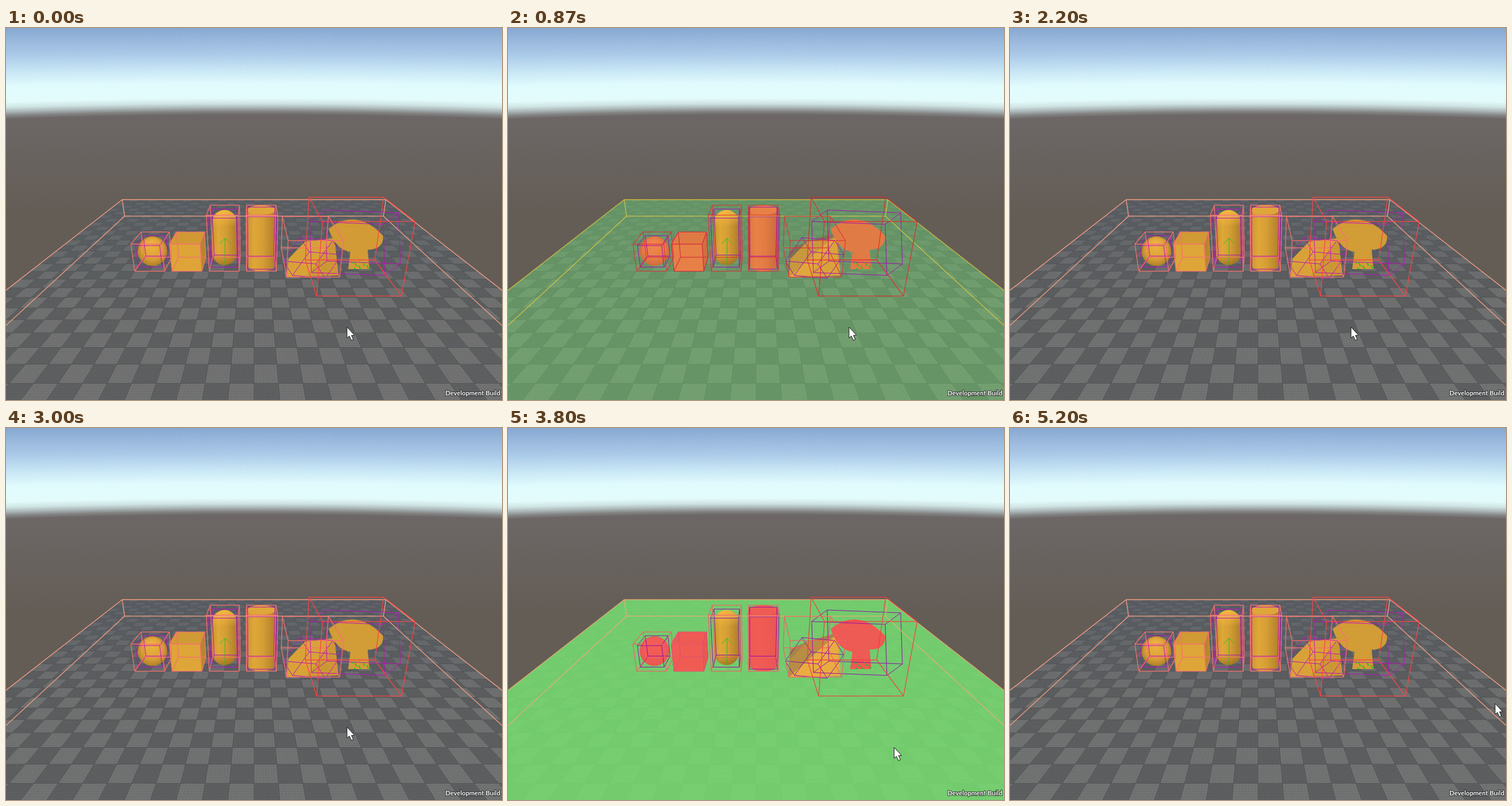
Animation, 864 px wide and 648 px high, one loop 5270 ms. Source, as an HTML page with a canvas:

```html
<!DOCTYPE html>
<html lang="en">
<head>
<meta charset="utf-8">
<title>Bounds view</title>
<style>
html, body { margin: 0; width: 100%; height: 100%; overflow: hidden; background: #655e57; }
canvas { display: block; }
</style>
</head>
<body>
<canvas id="stage" width="864" height="648"></canvas>
<script>
const W = 864, H = 648, LOOP = 5270, CYCLE = 3130;
const stage = document.getElementById('stage').getContext('2d');

// Camera: 60 degree view, pitched 20 degrees down, 5.5 above and 10 before the floor's centre.
const FOCAL = H / 2 / Math.tan(Math.PI / 6), PITCH = Math.PI / 9;
const SIN = Math.sin(PITCH), COS = Math.cos(PITCH);
const HALF = 7.5, TILE = .5;

function project(x, y, z) {
  const drop = 5.5 - y, far = 10 + z;
  const scale = FOCAL / (far * COS + drop * SIN);
  return [W / 2 + x * scale, H / 2 + (drop * COS - far * SIN) * scale, scale];
}

// Corner i of a box: bit 1 is right, bit 2 is top, bit 4 is back.
const side = (i, bit) => i & bit ? .5 : -.5;
const corner = (b, i, grow = 1) => project(
  b.x + b.w * grow * side(i, 1),
  b.y + b.h * (.5 + grow * side(i, 2)),
  b.z + b.d * grow * side(i, 4));

const bodies = [
  ...[1, 1, 2, 2].map((h, i) => ({ x: -3.5 + 1.25 * i, y: 0, z: 0, w: 1, h, d: 1 })),
  { x: 1.92, y: 0, z: .2, w: 1.72, h: 1.3, d: 2.15 },
  { x: 3.085, y: 0, z: -.82, w: 2.49, h: 2.35, d: 2.23 }
];
const [ball, cube, pill, drum] = bodies;
const slab = { x: 0, y: -1, z: 0, w: 2 * HALF, h: 1, d: 2 * HALF };

function layer(draw) {
  const c = document.createElement('canvas');
  c.width = W; c.height = H;
  draw(c.getContext('2d'));
  return c;
}

function trace(g, pts) {
  g.beginPath();
  pts.forEach(([x, y]) => g.lineTo(x, y));
}

function poly(g, color, ...pts) {
  trace(g, pts);
  g.closePath();
  g.fillStyle = color;
  g.fill();
}

function line(g, color, ...pts) {
  trace(g, pts);
  g.strokeStyle = color;
  g.stroke();
}

function wire(g, color, at) {
  for (let i = 0; i < 8; i++) {
    for (const bit of [1, 2, 4]) if (!(i & bit)) line(g, color, at(i), at(i | bit));
  }
}

// Skewed box on screen, spanned by three edges from one corner
const skewBox = (origin, ...edges) => i =>
  [0, 1].map(k => edges.reduce((sum, e, n) => sum + (i >> n & 1) * e[k], origin[k]));

function gradient(g, x0, y0, x1, y1, stops) {
  const gr = g.createLinearGradient(x0, y0, x1, y1);
  stops.forEach(([at, color]) => gr.addColorStop(at, color));
  return gr;
}

function sky(g) {
  const stops = [[0, '#89a8d2'], [.3, '#abcae8'], [.5, '#cbe9f6'], [.64, '#e1fbfd'],
    [.81, '#e3fbfb'], [.87, '#cfe3e3'], [.92, '#a8b4b5'], [.96, '#858585'], [1, '#6c6766']];
  for (let x = 0; x < W; x += 2) {
    const dip = 8 * (x / W * 2 - 1) ** 2;
    g.fillStyle = gradient(g, 0, 0, 0, 151 + dip, stops);
    g.fillRect(x, 0, 2, 170);
  }
  g.fillStyle = gradient(g, 0, 161, 0, 320, [[0, '#6c6766'], [1, '#645d56']]);
  g.fillRect(0, 161, W, H);
}

const ground = (x, z) => project(x, 0, z);
const floor = (g, color) => poly(g, color, ...[6, 7, 3, 2].map(i => corner(slab, i)));

function checker(g) {
  floor(g, '#727373');
  for (let x = -HALF; x < HALF; x += TILE) {
    for (let z = -HALF; z < HALF; z += TILE) {
      if ((x + z) / TILE & 1) {
        poly(g, '#5e5f61', ground(x, z), ground(x + TILE, z), ground(x + TILE, z + TILE), ground(x, z + TILE));
      }
    }
  }
  for (let s = -HALF; s <= HALF; s += TILE / 8) {
    const color = s % TILE ? 'rgba(50,52,56,.08)' : 'rgba(45,47,50,.35)';
    line(g, color, ground(s, -HALF), ground(s, HALF));
    line(g, color, ground(-HALF, s), ground(HALF, s));
  }
  const haze = gradient(g, 0, 299, 0, 470, [[0, 'rgba(90,96,104,.6)'], [1, 'rgba(90,96,104,0)']]);
  floor(g, haze);
}

function objects(g, flat) {
  const shape = (color, draw) => {
    g.fillStyle = color;
    g.beginPath();
    draw();
    g.fill();
  };
  const round = (x, r) => gradient(g, x - r, 0, x + r, 0,
    [[0, '#cb9632'], [.25, '#dfa738'], [.55, '#d59e35'], [1, '#ad7e29']]);

  const [bx, by, bs] = project(ball.x, .5, 0);
  const glow = g.createRadialGradient(bx - 2, by - 13, 3, bx, by, bs / 2 + 2);
  glow.addColorStop(0, '#eeb142');
  glow.addColorStop(.6, '#dda437');
  glow.addColorStop(1, '#ad7d29');
  shape(flat || glow, () => g.arc(bx, by, bs / 2 + .5, 0, 7));

  const cubeFace = (color, ...ids) => poly(g, flat || color, ...ids.map(i => corner(cube, i)));
  cubeFace('#d09a34', 2, 3, 7, 6);
  cubeFace('#b8862d', 1, 3, 7, 5);
  cubeFace('#dea538', 0, 1, 3, 2);

  const px = project(pill.x, 1, 0)[0];
  const capsule = () => g.roundRect(px - 21.5, 317, 43, 96, 21.5);
  shape(round(px, 21.5), capsule);
  shape(gradient(g, 0, 317, 0, 413, [[0, 'rgba(255,190,70,.75)'], [.3, 'rgba(255,190,70,0)'],
    [.8, 'rgba(120,80,20,0)'], [1, 'rgba(120,80,20,.5)']]), capsule);

  const dx = project(drum.x, 1, 0)[0];
  shape(flat || round(dx, 25), () => {
    g.ellipse(dx, 317, 25, 8, 0, Math.PI, 0);
    g.ellipse(dx, 415, 23, 9, 0, 0, Math.PI);
  });
  shape(flat || '#dfa63a', () => g.ellipse(dx, 317, 25, 8, 0, 0, 7));

  if (flat) {
    poly(g, '#b18b45', [489, 435], [492, 385], [520, 372], [576, 356]);
    poly(g, '#efb043', [576, 356], [579, 432], [489, 435]);
  } else {
    poly(g, '#d9a238', [489, 434], [492, 402], [521, 372], [572, 366], [579, 431]);
    poly(g, '#cc9835', [572, 366], [579, 431], [524, 432]);
  }

  // one plain shield stands in for the head model
  shape(flat || '#d29c36', () => {
    g.moveTo(562, 350);
    g.quadraticCurveTo(610, 312, 657, 362);
    g.quadraticCurveTo(658, 386, 630, 386);
    g.lineTo(633, 420);
    g.lineTo(596, 420);
    g.lineTo(600, 390);
    g.quadraticCurveTo(574, 386, 562, 350);
  });
}

function innerBoxes(g, color) {
  [[ball, .8], [pill, .88], [drum, .94]].forEach(([b, grow]) => wire(g, color, i => corner(b, i, grow)));
  wire(g, color, skewBox([483, 406], [57, 5], [29, -41], [16, 25]));
  wire(g, color, skewBox([529, 337], [128, 5], [3, 89], [27, -20]));
}

function marks(g) {
  line(g, '#1fc51f', [381.5, 413], [381.5, 366]);
  line(g, '#1fc51f', [372, 376], [381.5, 366], [391, 376]);
  g.fillStyle = '#20c020';
  for (let i = 0; i < 14; i++) g.fillRect(602 + i * 7 % 29, 408 + i * 5 % 11, 2, 2);
}

function outerBoxes(g, boxColor, bigColor, floorColor) {
  g.lineWidth = 1.3;
  wire(g, floorColor, i => corner(slab, i));
  bodies.forEach((b, n) => wire(g, n < 5 ? boxColor : bigColor, i => corner(b, i)));
}

const plain = layer(g => {
  sky(g);
  checker(g);
  objects(g);
  innerBoxes(g, '#bd10bd');
  marks(g);
});

const filled = layer(g => {
  floor(g, '#77df70');
  objects(g, '#f44f5a');
  innerBoxes(g, '#8d0aa6');
  wire(g, '#8d0aa6', i => corner(cube, i));
  marks(g);
});

const pinkLines = layer(g => outerBoxes(g, '#f77070', '#fa4444', '#f7a084'));
const redLines = layer(g => outerBoxes(g, '#d81420', '#e3131d', '#e6dc22'));

const ramp = (t, a, b) => Math.min(1, Math.max(0, (t - a) / (b - a)));

// Pointer path: time, x, y
const path = [[0, 594, 521], [3670, 594, 521], [4130, 870, 645], [4670, 850, 575], [5200, 845, 480], [LOOP, 845, 480]];

function pointer(t) {
  const i = path.findIndex(p => p[0] > t);
  const a = path[i - 1], b = path[i], k = ramp(t, a[0], b[0]);
  stage.save();
  stage.translate(a[1] + (b[1] - a[1]) * k, a[2] + (b[2] - a[2]) * k);
  poly(stage, '#fff', [0, 0], [0, 19], [4, 15.5], [7.5, 23], [11, 21.5], [7.7, 14.5], [13, 14]);
  stage.strokeStyle = '#111';
  stage.lineWidth = 1;
  stage.stroke();
  stage.restore();
}

function label() {
  stage.font = 'bold 11.2px Lato, "Open Sans", sans-serif';
  stage.textAlign = 'right';
  stage.lineJoin = 'round';
  stage.lineWidth = 2;
  stage.strokeStyle = 'rgba(20,20,20,.75)';
  stage.strokeText('Development Build', 861, 640);
  stage.fillStyle = '#fff';
  stage.fillText('Development Build', 861, 640);
}

function put(image, alpha) {
  stage.globalAlpha = alpha;
  stage.drawImage(image, 0, 0);
  stage.globalAlpha = 1;
}

function frame(now) {
  const t = now % LOOP, p = t % CYCLE;
  const out = ramp(p, 600, 1070);
  const red = p < 1330 ? out : 0;
  put(plain, 1);
  put(filled, Math.min(ramp(p, 0, 400), 1 - out));
  put(pinkLines, 1 - red);
  put(redLines, red);
  label();
  pointer(t);
}

const start = performance.now();
function tick() {
  frame(performance.now() - start);
  requestAnimationFrame(tick);
}
tick();
</script>
</body>
</html>
```
